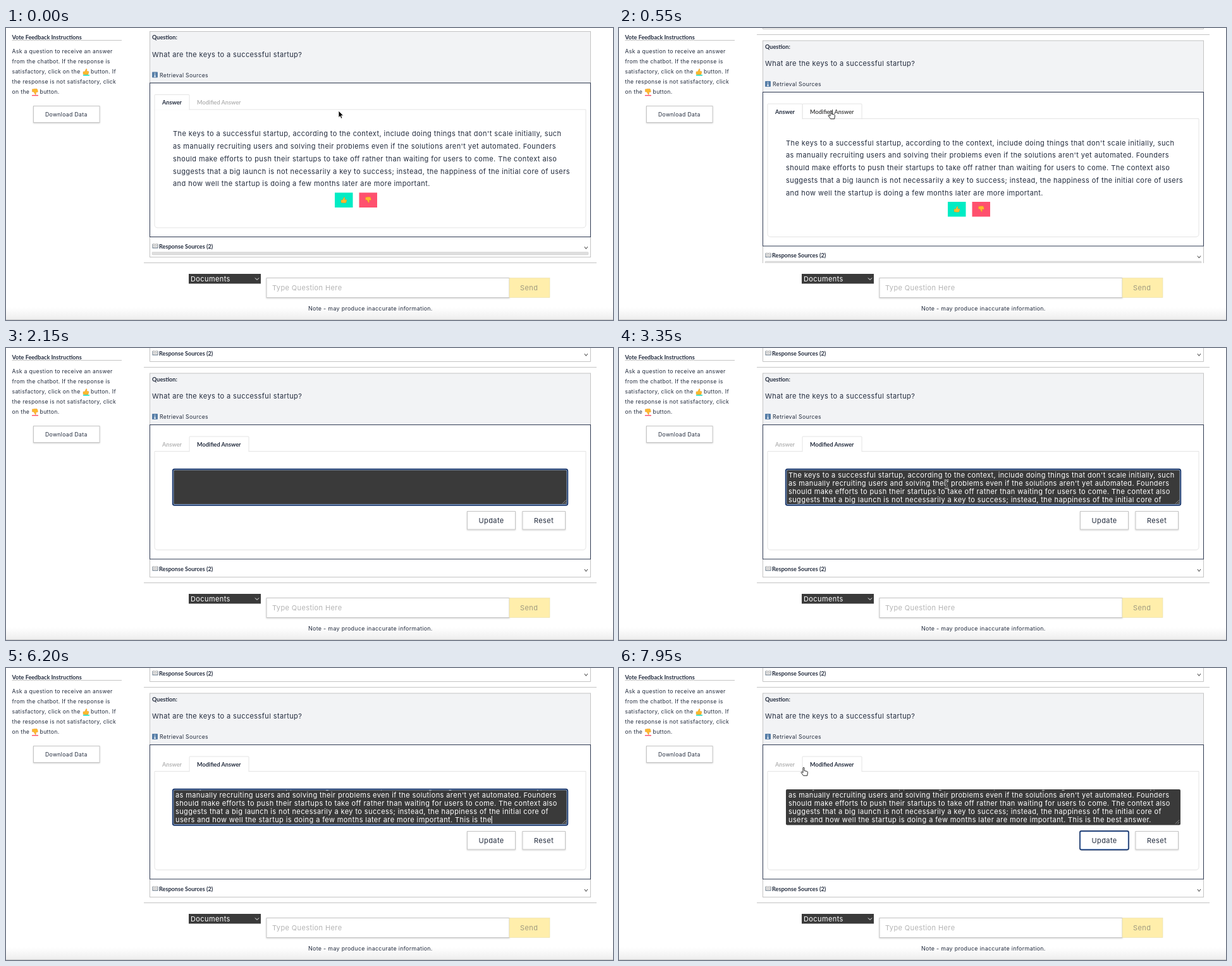
Write an HTML page that moves like this. It is 960x462 px and loops after 8 s.

```html
<!DOCTYPE html>
<html lang="en">
<head>
<meta charset="utf-8">
<title>Vote feedback</title>
<style>
  html, body { margin: 0; width: 100%; height: 100%; overflow: hidden; background: #fff; }
  svg { display: block; width: 100vw; height: 100vh; }
  text { font: 11px Inter, sans-serif; letter-spacing: .036em; fill: #232c3e; dominant-baseline: central; white-space: pre; }
  .small { font-size: 8.7px; }
  .note { font-size: 8.9px; }
  .answer { letter-spacing: .039em; }
  .bold { font: bold 9.1px Lato, sans-serif; letter-spacing: 0; }
  .light { fill: #fff; }
  .line { fill: none; stroke: #c4c4c4; }
  .box { fill: #fff; stroke: #c4c4c4; }
  .panel { fill: #fff; stroke: #2f3a52; }
  .tab { fill: #fff; stroke: #e4e4e4; }
  .dark { fill: #3a3a3a; }
  .ring { fill: none; stroke: #17356b; stroke-width: 1.6; }
  .glow { fill: none; stroke: #a9c8f5; }
</style>
</head>
<body>
<svg id="stage" viewBox="0 0 960 462" preserveAspectRatio="none"></svg>
<script>
const text = (x, y, str, cls = '', id = '') => `<text x="${x}" y="${y}" class="${cls}" id="${id}">${str}</text>`;
const rect = (x, y, w, h, cls, more = '') => `<rect x="${x}" y="${y}" width="${w}" height="${h}" class="${cls}" ${more}/>`;
const path = (d, cls = 'line', more = '') => `<path d="${d}" class="${cls}" ${more}/>`;
const use = (name, x, y, more = '') => `<use href="#${name}" transform="translate(${x} ${y}) ${more}"/>`;
const lines = (x, y, step, list, cls) => list.map((s, i) => text(x, y + i * step, s, cls)).join('');
const button = (x, y, w, h, label, tx, cls) => rect(x, y, w, h, 'box', 'filter="url(#shade)"') + text(tx, y + h / 2, label, cls);

const answer = [
  "The keys to a successful startup, according to the context, include doing things that don't scale initially, such",
  "as manually recruiting users and solving their problems even if the solutions aren't yet automated. Founders",
  "should make efforts to push their startups to take off rather than waiting for users to come. The context also",
  "suggests that a big launch is not necessarily a key to success; instead, the happiness of the initial core of users",
  "and how well the startup is doing a few months later are more important."];
const editable = [...answer.slice(0, 3), answer[3].replace(/ users$/, ''), 'users ' + answer[4]];
const addition = ' This is the best answer.';

const defs = `<defs>
  <filter id="shade" x="-10%" y="-20%" width="120%" height="150%"><feDropShadow dx="0" dy="1" stdDeviation=".9" flood-opacity=".18"/></filter>
  <linearGradient id="floor" x2="0" y2="1"><stop stop-color="#fff"/><stop offset="1" stop-color="#ededed"/></linearGradient>
  <clipPath id="view"><rect width="960" height="372"/></clipPath>
  <clipPath id="field"><rect x="265" y="153" width="622" height="55"/></clipPath>
  <path id="thumb" fill="#ffb92e" stroke="#d98a1c" stroke-width=".4" d="M-4.5 0h2.4L.4-4.6q1.7.2 1 2.8L1.1-.5h2.6q1 .3.7 1.2l-.9 3.2q-.2.8-1 .8h-3.7q-1.2-.5-3.3-.5z"/>
  <g id="info"><rect width="9" height="9" rx="1" fill="#587fa8"/><path d="M4.5 1.6v1.2M4.5 3.8v3.6M3.2 7.3h2.6" stroke="#fff" stroke-width="1.2"/></g>
  <g id="book"><path d="M0 1v6.5h9V1" fill="#59748f"/><path d="M.6.6Q3 0 4.5 1.2 6 0 8.4.6v6Q6 6 4.5 7 3 6 .6 6.6z" fill="#eee" stroke="#8a8a8a" stroke-width=".5"/><path d="M4.5 1v6M1.6 2.5h2M1.6 4h2M5.5 2.5h2M5.5 4h2" stroke="#999" stroke-width=".5"/></g>
  <path id="arrow" fill="#000" stroke="#fff" stroke-width=".8" d="M0 0V10.6L2.4 8.4 4 12.2 5.9 11.4 4.3 7.7H7.6Z"/>
  <path id="hand" fill="#fff" stroke="#111" stroke-width=".9" d="M-1 1Q-1-.2 0-.2T1 1v4l4.3 1q1.3.4 1.2 1.8l-.8 5H-.4L-4 7.8q.3-1.3 1.8-.7L-1 8.2z"/>
  <g id="ibeam" fill="none"><path id="beam" d="M-3-6.5Q0-6.5 0-5V5Q0 6.5-3 6.5M3-6.5Q0-6.5 0-5V5Q0 6.5 3 6.5M-1.8 2h3.6" stroke="#eee" stroke-width="2"/><use href="#beam"/><path d="M-3-6.5Q0-6.5 0-5V5Q0 6.5-3 6.5M3-6.5Q0-6.5 0-5V5Q0 6.5 3 6.5M-1.8 2h3.6" stroke="#222" stroke-width=".9"/></g>
</defs>`;

const sidebar = text(9.5, 14, 'Vote Feedback Instructions', 'bold') + path('M9.5 19.5H183')
  + lines(9.5, 37, 16, ['Ask a question to receive an answer', 'from the chatbot. If the response is',
    'satisfactory, click on the', 'the response is not satisfactory, click', 'on the'], 'small')
  + text(134, 69, 'button. If', 'small') + text(53.5, 101, 'button.', 'small')
  + use('thumb', 126.5, 69) + path('M122 74.7h10', '', 'stroke="#00dfc0" stroke-width="1.4"')
  + use('thumb', 46, 101, 'scale(1 -1)') + path('M41 106.7h10', '', 'stroke="#ff4d6a" stroke-width="1.4"')
  + button(43.5, 123.5, 104.5, 26, 'Download Data', 62, 'small');

const footer = rect(0, 442, 960, 20, '', 'fill="url(#floor)"') + path('M0 461.7H960', '', 'stroke="#aaa" stroke-width=".6"')
  + rect(289, 389, 114, 15.5, 'dark') + text(292, 397, 'Documents', 'light') + path('M394 395.5l3 3 3-3', '', 'fill="none" stroke="#fff"')
  + rect(412, 395.5, 384, 31, 'box', 'filter="url(#shade)"') + text(421, 411, 'Type Question Here', '', 'hint')
  + rect(796, 395.5, 64, 31, '', 'fill="#ffeeab" stroke="#e8deb0" stroke-width=".6"') + text(813, 411, 'Send', '', 'send')
  + text(478, 443, 'Note - may produce inaccurate information.', 'note');

const sources = y => use('book', 231.5, y - 4) + text(242, y, 'Response Sources (2)', 'bold') + path(`M915 ${y + 1}l2.4 3.5 2.4-3.5`, '', 'fill="none" stroke="#333"');
const frame = (panelEnd, end, label) => rect(227.5, 81.5, 697, end - 81.5, 'box') + rect(227.5, 81.5, 697, panelEnd - 81.5, 'panel')
  + sources(label) + path(`M218 ${end + 9}H934`);
const content = end => path(`M235 123.5H917V${end - 5}q0 5-5 5H240q-5 0-5-5z`, 'tab');
const tab = (x, w) => path(`M${x} 124.2V101q0-1 1-1h${w - 2}q1 0 1 1v23.2`, 'tab');

const heading = path('M227.5-60V-18.5H924.5V-60') + sources(-32) + path('M218-9.5H934')
  + rect(227.5, 0, 697, 81.5, '', 'fill="#f2f3f5" stroke="#c4c4c4"')
  + text(231, 9, 'Question:', 'bold') + text(231, 36, 'What are the keys to a successful startup?')
  + use('info', 231, 64) + text(243, 69, 'Retrieval Sources', 'small');

const answerView = `<g id="answerView">${frame(325, 357, 339.5)}
  ${rect(231, 349, 690, 4.5, '', 'rx="1" fill="#dedede" stroke="#c8c8c8" stroke-width=".5"')}
  ${content(310.5)}<g id="hover">${tab(290, 94)}${path('M290 123.5h94', 'tab')}</g>${tab(235, 55)}
  ${lines(264, 161.5, 19.85, answer, 'answer')}
  ${rect(520, 255, 28.5, 23.5, '', 'fill="#00ecc4"')}${use('thumb', 534.5, 266.5)}
  ${rect(558.5, 255, 28.5, 23.5, '', 'fill="#ff506e"')}${use('thumb', 573, 266.5, 'scale(1 -1)')}</g>`;

const editView = `<g id="editView">${frame(294, 322.5, 309)}${content(279.5)}${tab(290, 94)}
  ${rect(264, 152, 624, 56.5, 'dark', 'rx="2"')}
  <g clip-path="url(#field)"><g id="draft">${lines(268, 161, 13, editable.slice(0, 4), 'light')}${text(268, 213, '', 'light', 'last')}</g>
  <path id="caret" d="M0 0v12" stroke="#fff"/></g>
  ${path('M880 206.5l6-6M883.5 206.5l2.5-2.5', '', 'stroke="#bbb" stroke-width=".7"')}
  <g id="fieldFocus">${rect(264.8, 152.8, 622.4, 54.9, 'glow', 'rx="2"')}${rect(263.6, 151.6, 624.8, 57.3, 'ring', 'rx="3"')}</g>
  ${button(729.5, 218.5, 76, 28.5, 'Update', 747.5)}${button(817, 218.5, 67.5, 28.5, 'Reset', 835)}
  <g id="buttonFocus">${rect(730, 219, 75, 27.5, 'glow', 'rx="1"')}${rect(728.9, 217.9, 77.2, 29.7, 'ring', 'rx="2.5"')}</g></g>`;

const $ = id => document.getElementById(id);
$('stage').innerHTML = defs + footer + `<g clip-path="url(#view)"><g id="page">${heading}${answerView}${editView}
  ${text(247, 112, 'Answer', 'bold', 'tabA')}${text(302, 112, 'Modified Answer', 'bold', 'tabB')}</g></g>${sidebar}<use id="cursor"/>`;
$('hint').style.fill = '#b4b4b4';
$('send').style.fill = '#a09a80';

// time, x, y, cursor shape until the next key
const pointer = [
  [0, 526, 131, 'arrow'], [50, 526, 131, 'arrow'], [400, 383, 132, 'hand'], [550, 335, 131, 'hand'],
  [850, 335, 131, 'hand'], [1050, 350, 150, 'arrow'], [1250, 385, 192, 'ibeam'], [1600, 430, 225, 'ibeam'],
  [1850, 430, 225, ''], [3100, 288, 195, 'ibeam'], [3350, 516, 216, 'ibeam'], [3475, 774, 186, 'ibeam'],
  [3600, 715, 236, 'ibeam'], [4100, 715, 236, 'ibeam'], [4200, 716, 250, 'arrow'], [4300, 721, 254, 'arrow'],
  [4400, 724, 248, 'ibeam'], [4650, 720, 241, 'ibeam'], [4900, 720, 241, ''], [7250, 720, 241, 'ibeam'],
  [7300, 732, 262, 'arrow'], [7450, 750, 292, 'hand'], [7600, 766, 280, 'hand'], [7750, 766, 280, 'arrow'],
  [7950, 292, 157.5, 'hand'], [8000, 292, 157.5, 'hand']];
const typing = [[0, 0], [5150, 0], [5200, 1], [5500, 6], [5900, 6], [5950, 7], [6200, 12], [6250, 12], [6300, 13], [6750, 23], [6850, 25], [8000, 25]];
const caretTimes = [[1900, 2150], [2400, 2650], [4900, 5800], [5950, 7100]];

const within = (t, a, b) => t >= a && t < b;
function sample(keys, t) {
  const i = keys.findIndex(k => k[0] > t), a = keys[i - 1], b = keys[i], p = (t - a[0]) / (b[0] - a[0]);
  return a.map((v, n) => typeof v === 'number' ? v + (b[n] - v) * p : v);
}
function ramp(t, a, b) {
  const p = Math.min(1, Math.max(0, (t - a) / (b - a)));
  return p * p * (3 - 2 * p);
}
const show = (id, on) => $(id).style.display = on ? '' : 'none';

function draw(t) {
  const editing = t >= 900, focused = within(t, 1600, 7550);
  const top = editing ? 40 : 5.5 + 14.5 * ramp(t, 50, 400);
  $('page').setAttribute('transform', `translate(0 ${top})`);
  show('answerView', !editing);
  show('editView', editing);
  show('hover', t >= 400);
  $('tabA').style.fill = editing ? '#b5b5b5' : '#232c3e';
  $('tabB').style.fill = editing ? '#232c3e' : t >= 400 ? '#4a4a4a' : '#b5b5b5';

  const empty = within(t, 1900, 2300) || within(t, 2400, 2850);
  show('draft', !empty);
  $('draft').setAttribute('transform', `translate(0 ${-13 * ramp(t, 3750, 3950)})`);
  $('last').textContent = editable[4] + addition.slice(0, Math.floor(sample(typing, t)[1] + .001));
  const caretOn = caretTimes.some(([a, b]) => within(t, a, b));
  show('caret', caretOn);
  if (caretOn) {
    const x = empty ? 268.5 : 268.5 + $('last').getComputedTextLength();
    const y = !empty ? 194 : t < 2300 ? 168 : 155;
    $('caret').setAttribute('transform', `translate(${x} ${y})`);
  }
  show('fieldFocus', focused);
  show('buttonFocus', t >= 7550);

  const [, x, y, shape] = sample(pointer, t);
  show('cursor', shape);
  $('cursor').setAttribute('href', '#' + (shape || 'arrow'));
  $('cursor').setAttribute('transform', `translate(${x} ${y})`);
}

const start = performance.now();
function tick() {
  draw((performance.now() - start) % 8000);
  requestAnimationFrame(tick);
}
tick();
</script>
</body>
</html>
```
